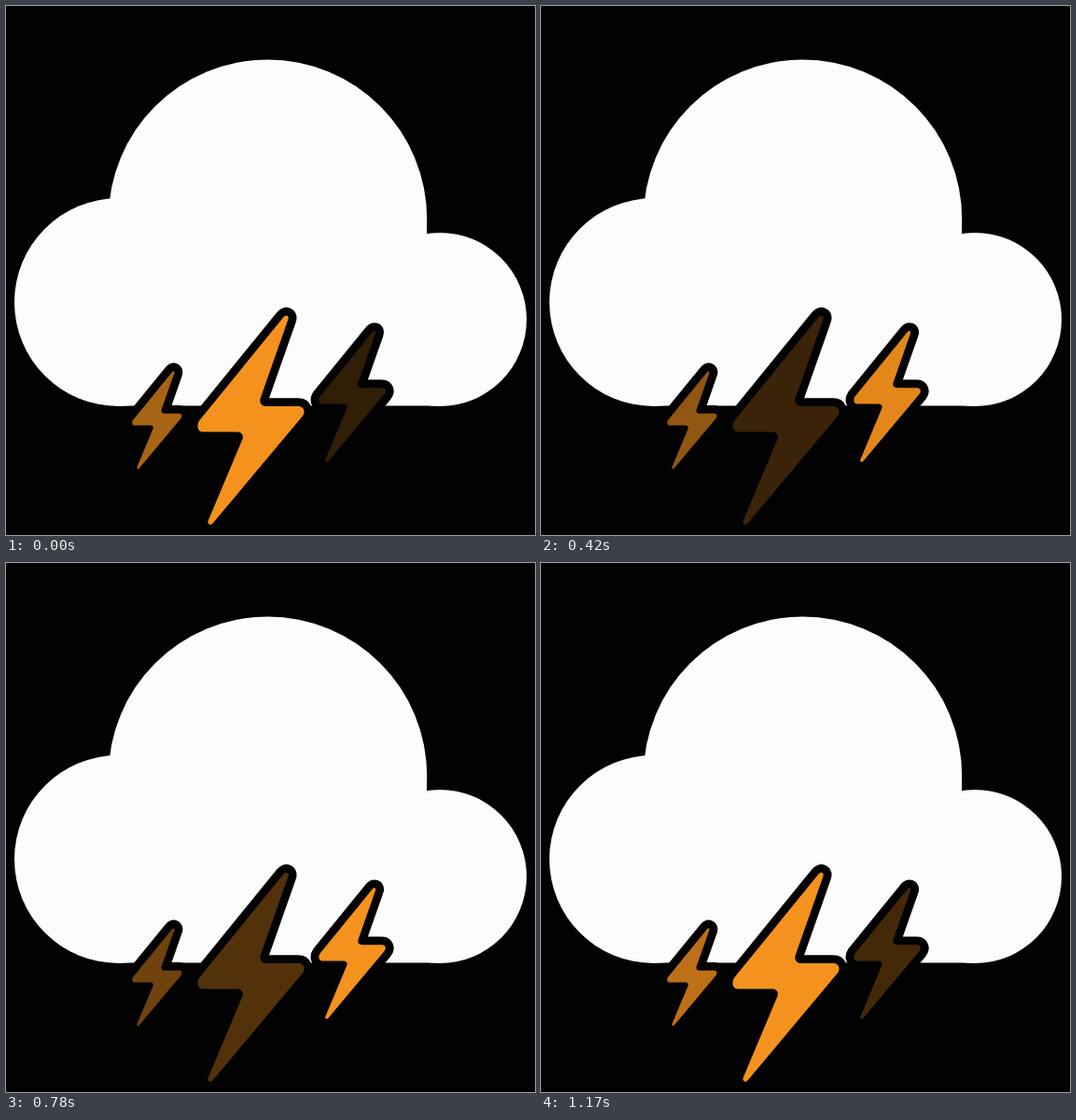
Animation of 567 by 567 pixels, one loop 1.2 s. Source, as an HTML page:

```html
<!DOCTYPE html>
<html lang="en">
<head>
<meta charset="utf-8">
<title>Thunder cloud</title>
<style>
  html, body { margin: 0; width: 100%; height: 100%; overflow: hidden; background: #020202; }
  svg { display: block; width: 100vw; height: 100vh; }
  .bolt { fill: #f5921e; }
  .rim { fill: #020202; stroke: #020202; stroke-width: 17.5; stroke-linejoin: round; }
  #bolt { vector-effect: non-scaling-stroke; }
</style>
</head>
<body>
<svg viewBox="0 0 567 567">
  <defs>
    <path id="bolt" d="M92 3C95-1 99 1 97.4 5L67.5 90C66.5 94 69 98 74 98H108C114.5 98 116.5 104 112.5 109L17 223C14 227 10 224 12 220L48.6 133C50 129 47 125.5 43 125.5H6C0 125.5-1 118 2.5 113Z"/>
  </defs>
  <g fill="#fcfcfc">
    <circle cx="280.5" cy="228.2" r="170.7"/>
    <circle cx="120.5" cy="317.5" r="111.5"/>
    <circle cx="465" cy="336" r="93"/>
    <path d="M120 230H451V336H465V428.4H120Z"/>
  </g>
  <g id="bolts"></g>
</svg>
<script>
const LOOP = 1200, STEP = 30, FADE = 330;

// A strike ramps up over `rise`, is fully lit from `at` for `hold`, then fades out.
const strike = (at, rise = 150, hold = 0) => ({ at, rise, hold });

const bolts = [
  { x: 135, y: 391, scale: 0.467, strikes: [strike(283, 80), strike(598), strike(1095, 275)] },
  { x: 205, y: 331, scale: 1, strikes: [strike(560), strike(910, 150, 455)] },
  { x: 335, y: 347.7, scale: 0.627, strikes: [strike(460, 570), strike(770, 130, 160)] }
];

const layer = document.getElementById('bolts');
for (const bolt of bolts) {
  const place = `href="#bolt" transform="translate(${bolt.x} ${bolt.y}) scale(${bolt.scale})"`;
  layer.insertAdjacentHTML('beforeend', `<use class="rim" ${place}/><use class="bolt" ${place}/>`);
  bolt.shape = layer.lastElementChild;
}

function glowOf({ at, rise, hold }, t) {
  const age = t - at;
  return Math.max(0, Math.min(1, 1 + age / rise, 1 - (age - hold) / FADE));
}

// Strikes of the neighbouring loops reach into this one; the brightest wins.
function brightness(strikes, t) {
  return Math.max(...[t - LOOP, t, t + LOOP].flatMap(time => strikes.map(s => glowOf(s, time))));
}

function draw(now) {
  const t = Math.floor(now % LOOP / STEP) * STEP;
  for (const { shape, strikes } of bolts) shape.setAttribute('opacity', brightness(strikes, t));
}

const start = performance.now();
function tick() {
  draw(performance.now() - start);
  requestAnimationFrame(tick);
}
tick();
</script>
</body>
</html>
```
